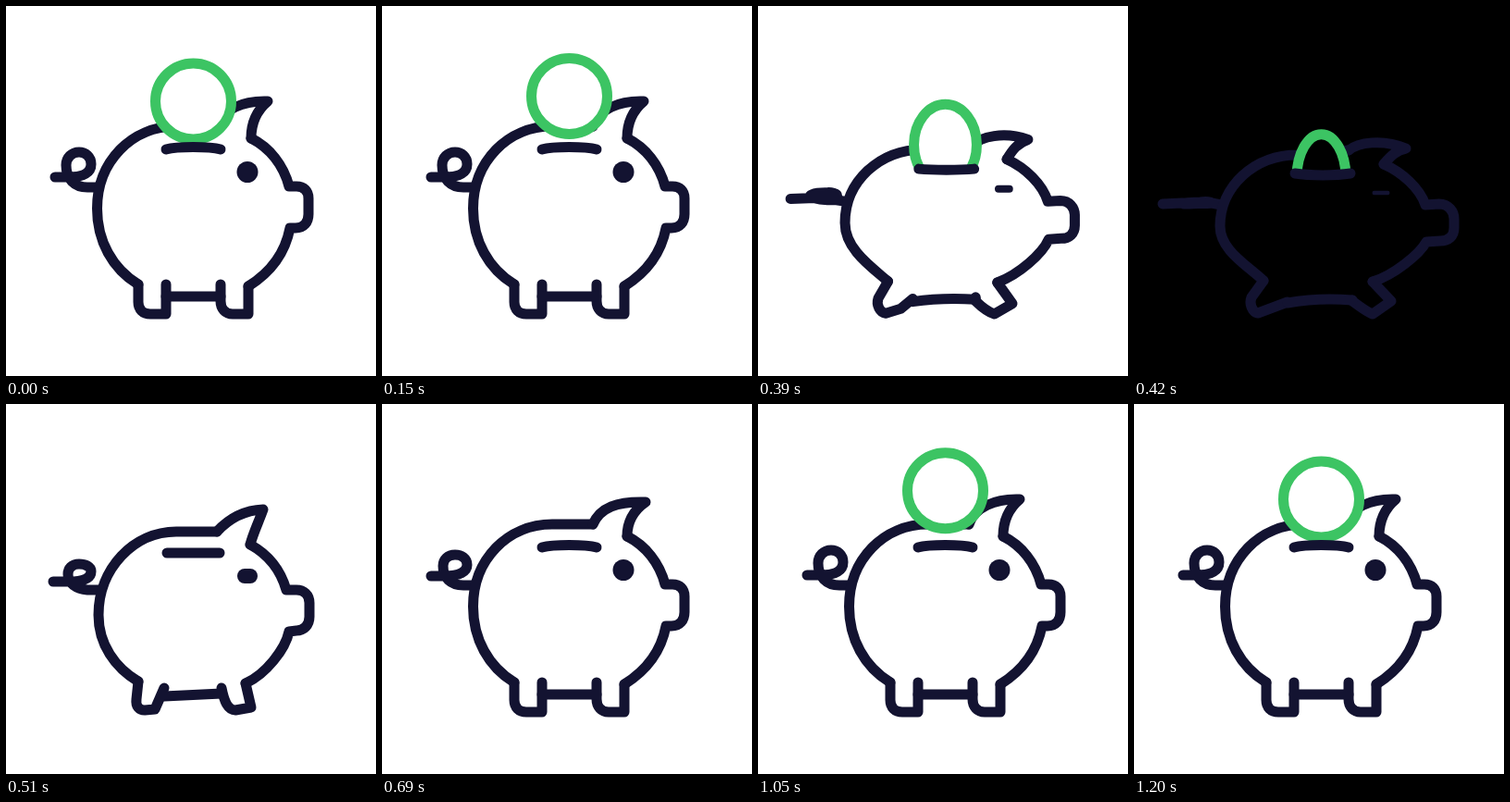
These frames come from a looping animation (400x400 px, 1260 ms). An HTML page:

```html
<!DOCTYPE html>
<html lang="en">
<head>
<meta charset="utf-8">
<title>Piggy bank</title>
<style>
  html, body { margin: 0; width: 100%; height: 100%; overflow: hidden; background: #fff; }
  svg { display: block; width: 100vw; height: 100vh; }
  .ink { fill: none; stroke: #131331; stroke-width: 11; stroke-linecap: round; stroke-linejoin: round; }
</style>
</head>
<body>
<svg viewBox="0 0 400 400">
  <clipPath id="above"><path id="mask"/></clipPath>
  <rect id="bg" width="400" height="400"/>
  <g class="ink">
    <path id="tail"/>
    <path id="back"/>
    <path id="ear"/>
    <path id="face"/>
    <path id="hind"/>
    <path id="front"/>
    <path id="belly"/>
  </g>
  <g clip-path="url(#above)">
    <ellipse id="coin" cx="202.5" stroke="#3cc463" stroke-width="11"/>
  </g>
  <path id="slot" class="ink"/>
  <rect id="eye" fill="#131331"/>
</svg>
<script>
const LOOP = 1260, STEP = 30, LAST = 1200;
const $ = id => document.getElementById(id);

// Each part: rest, squashed, recoiling and (optionally) a late wobble pose.
const parts = {
  tail: [
    'M53 185L68 185C84 185 92 180 92 171C92 163 86 158 79 158C71 158 65 164 65 172C65 187 74 196 88 196L99 196',
    'M31 214L52 213C66 213 84 214 84 213C84 212 78 211 72 212C62 212 54 213 54 214C62 214 76 213 84 213L94 215',
    'M51 192L68 192C84 192 92 188 92 181C92 176 86 173 79 173C71 173 67 178 67 184C67 194 76 200 88 201L102 201',
    'M53 186L68 186C84 186 92 181 92 174C92 167 86 163 79 163C71 163 66 168 66 175C66 188 74 196 88 196L99 196'
  ],
  back: [
    'M143 301C115 284 98.5 254 98.5 219C98.5 168 136 130 184 130L228 130',
    'M140 297C122 280 93 264 93 238C93 195 130 161 177 161L232 156',
    'M143 300C118 285 100 260 100 228C100 178 138 138 184 138L228 138'
  ],
  ear: [
    'M228 130C234 112 256 102 283 103C271 113 265 126 265 143',
    'M232 156C242 148 268 143 294 154C283 156 277 163 270 171',
    'M228 138C239 126 254 115 278 114C273 128 267 140 264 152',
    'M228 130C236 112 254 105 285 106C272 115 265 128 265 143'
  ],
  face: [
    'M265 143C285 153 300 172 306 195L314 195C322 195 327 200 327 208L327 225C327 234 322 240 313 240L307 240C302 266 286 288 262 303',
    'M270 171C290 180 309 197 315 215L330 214C340 214 346 222 346 230L346 240C346 249 340 254 331 254L316 255C309 268 281 291 258 298',
    'M264 152C284 163 297 180 303 201L314 201C322 201 328 206 328 215L328 230C328 239 322 245 314 245L306 246C302 265 281 292 259 302'
  ],
  hind: [
    'M143 301L143 320C143 328 148 333 156 333L173 333L173 301',
    'M140 297L127 315C124 322 128 331 134 332L150 326L166 320',
    'M143 300L141 319C140 327 144 331 150 331L161 330L171 307'
  ],
  front: [
    'M262 303L262 333L245 333C237 333 232 327 232 319L232 301',
    'M258 298L278 319L258 333C250 330 242 323 236 319L236 318',
    'M259 302L265 328L248 331C240 331 236 322 233 307L233 307'
  ],
  belly: [
    'M173 314C192 314 212 314 232 314',
    'M166 321C188 317 212 316 236 318',
    'M171 316C192 315 212 314 233 313'
  ],
  slot: [
    'M173 155C185 151.5 220 151.5 232 155',
    'M174 181C190 183.5 218 183.5 234 181',
    'M174 161C190 161 218 161 231 161'
  ]
};

const smooth = p => (1 - Math.cos(Math.PI * p)) / 2;
const easeIn = e => p => p ** e;
const easeOut = e => p => 1 - (1 - p) ** e;
const mix = (a, b, p) => a + (b - a) * p;

function morph(a, b, p) {
  const nums = b.match(/[\d.]+/g);
  let i = 0;
  return a.replace(/[\d.]+/g, n => mix(+n, +nums[i++], p).toFixed(2));
}

// Runs through [start, end, from, to, ease] and returns the current value.
function track(t, segs) {
  let seg = segs[0];
  for (const s of segs) if (t >= s[0]) seg = s;
  const [t0, t1, from, to, ease] = seg;
  return mix(from, to, ease(Math.min(1, Math.max(0, (t - t0) / (t1 - t0)))));
}

function pose(t, wobbles) {
  const keys = wobbles
    ? [[315, 0], [420, 1], [510, 2], [690, 3], [720, 0]]
    : [[315, 0], [420, 1], [510, 2], [615, 0]];
  for (let i = 1; i < keys.length; i++) {
    const [t0, a] = keys[i - 1], [t1, b] = keys[i];
    if (t >= t0 && t < t1) return [a, b, smooth((t - t0) / (t1 - t0))];
  }
  return [0, 0, 0];
}

function drawEye(t) {
  const shapes = [[261, 179.5, 11.5, 11.5], [267, 202, 9.5, 2.3], [261, 186, 11, 8]];
  const [a, b, p] = pose(t);
  const [x, y, w, h] = shapes[a].map((v, i) => mix(v, shapes[b][i], p));
  set('eye', { x: x - w, y: y - h, width: 2 * w, height: 2 * h, rx: Math.min(w, h) });
}

function drawCoin(t, bg) {
  const coin = {
    cy: track(t, [
      [0, 280, 103, 93, smooth], [280, 450, 93, 229, easeIn(2)],
      [810, 990, 210, 87, easeOut(1.68)], [990, 1200, 87, 103, easeOut(1.6)]
    ]),
    rx: track(t, [[280, 450, 41, 15, easeIn(3)], [810, 990, 28, 41, easeOut(2)]]),
    ry: track(t, [[280, 450, 41, 51, easeIn(3)], [810, 990, 39, 41, easeOut(2)]]),
    fill: bg,
    visibility: t >= 450 && t <= 810 ? 'hidden' : 'visible'
  };
  set('coin', coin);
}

function set(id, attrs) {
  for (const k in attrs) $(id).setAttribute(k, attrs[k]);
}

function draw(t) {
  const bg = t >= 420 && t < 450 ? '#000' : '#fff';
  set('bg', { fill: bg });
  document.body.style.background = bg;
  for (const id in parts) {
    const poses = parts[id];
    const [a, b, p] = pose(t, poses.length > 3);
    set(id, { d: morph(poses[a], poses[b], p) });
  }
  const edge = $('slot').getAttribute('d').slice(1);
  set('mask', { d: `M0 0L0 160L${edge}L400 160L400 0Z` });
  drawCoin(t, bg);
  drawEye(t);
}

const start = performance.now();
function tick() {
  const t = (performance.now() - start) % LOOP;
  draw(Math.min(LAST, Math.floor(t / STEP) * STEP));
  requestAnimationFrame(tick);
}
tick();
</script>
</body>
</html>
```
